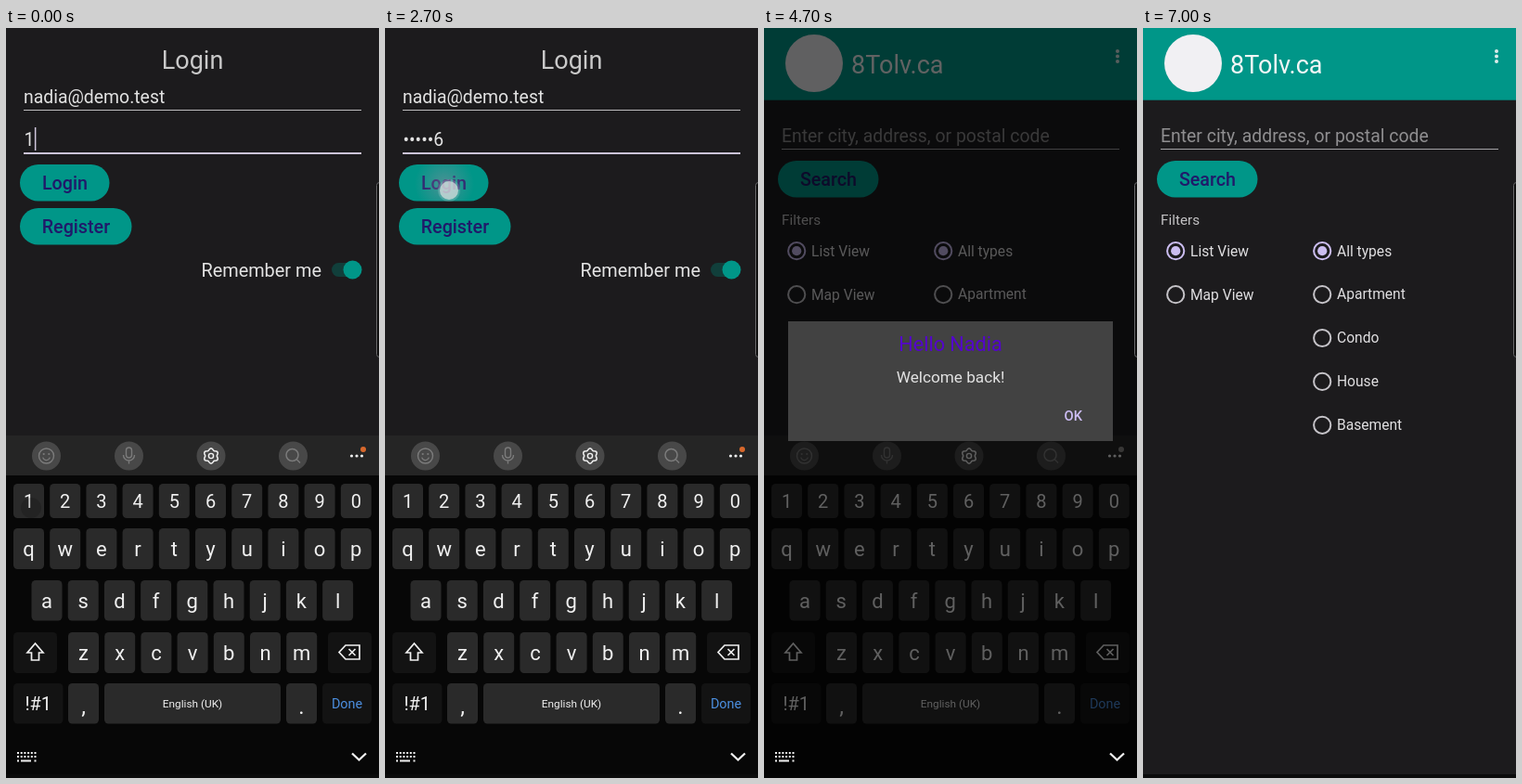
Write an HTML page with a canvas that moves like this. It is 402 px wide and 808 px high and loops after 7300 ms.

```html
<!DOCTYPE html>
<html lang="en">
<head>
<meta charset="utf-8">
<title>Login walkthrough</title>
<style>
html, body { margin: 0; width: 100%; height: 100%; overflow: hidden; background: #1c1b1d; }
canvas { display: block; width: 402px; height: 808px; }
</style>
</head>
<body>
<canvas id="stage" width="402" height="808"></canvas>
<script>
const ctx = document.getElementById('stage').getContext('2d');
const LOOP = 7300, STEP = 100;
const BG = '#1c1b1d', TEAL = '#009688', LAVENDER = '#cbbdf0', NAVY = '#20196a';
const TYPED_AT = [0, 400, 800, 1100, 1500, 1800];
const MASK_AT = 3300;

const clamp = v => Math.max(0, Math.min(1, v));
const ramp = (t, from, to) => clamp((t - from) / (to - from));

function text(str, x, y, size, color, align = 'left', weight = 400) {
  ctx.font = `${weight} ${size}px Roboto, sans-serif`;
  ctx.textAlign = align;
  ctx.fillStyle = color;
  ctx.fillText(str, x, y);
}

function rect(x, y, w, h, color) {
  ctx.fillStyle = color;
  ctx.fillRect(x, y, w, h);
}

function round(x, y, w, h, r, color) {
  ctx.beginPath();
  ctx.roundRect(x, y, w, h, r);
  ctx.fillStyle = color;
  ctx.fill();
}

function disc(x, y, r, color) {
  ctx.beginPath();
  ctx.arc(x, y, r, 0, Math.PI * 2);
  ctx.fillStyle = color;
  ctx.fill();
}

function ring(x, y, r, color, width) {
  ctx.beginPath();
  ctx.arc(x, y, r, 0, Math.PI * 2);
  stroke(color, width);
}

function stroke(color, width) {
  ctx.strokeStyle = color;
  ctx.lineWidth = width;
  ctx.stroke();
}

function poly(points, color, width, closed) {
  ctx.beginPath();
  points.forEach(([x, y]) => ctx.lineTo(x, y));
  if (closed) ctx.closePath();
  stroke(color, width);
}

function faded(alpha, draw) {
  if (alpha <= 0) return;
  ctx.save();
  ctx.globalAlpha = alpha;
  draw();
  ctx.restore();
}

function pill(label, y, w) {
  round(15, y, w, 39.6, 19.8, TEAL);
  text(label, 15.2 + w / 2, y + 27, 19.7, NAVY, 'center', 500);
}

function pointer(x, y, alpha, halo) {
  faded(alpha, () => {
    disc(x, y, halo, 'rgba(255,255,255,.16)');
    disc(x, y, 10, 'rgba(225,225,225,.68)');
  });
}

function drawPassword(t) {
  const count = TYPED_AT.filter(at => t >= at).length;
  const shown = t >= MASK_AT ? '•'.repeat(count) : '•'.repeat(count - 1) + count;
  text(shown, 19.5, 127, 19.4, '#e2e2e2');
  const width = ctx.measureText(shown).width;
  const idle = t - TYPED_AT[count - 1];
  if (idle % 1000 < 500) rect(20 + width, 107, 1.5, 25, '#cfc6dc');
}

function drawLogin(t) {
  rect(0, 0, 402, 808, BG);
  text('Login', 201, 43.5, 27, '#c9c9c9', 'center');
  text('nadia@demo.test', 19, 81, 19.4, '#e2e2e2');
  rect(19, 88, 364, 1, '#bdbcbe');
  drawPassword(t);
  rect(19, 134, 364, 2, '#cbc3d8');
  pill('Login', 147, 96.5);
  pill('Register', 194, 120.5);
  text('Remember me', 340, 268, 19.9, '#e2e2e2', 'right');
  round(351, 253, 32, 15, 7.5, '#113f3b');
  disc(373.5, 260.5, 10, TEAL);
}

function radio(label, x, y, on) {
  ring(x + 0.2, y + 0.2, 9.1, on ? LAVENDER : '#c5c3c8', 2);
  if (on) disc(x + 0.2, y + 0.2, 5.1, LAVENDER);
  text(label, x + 16, y + 5.5, 15.6, '#e0dfe1');
}

function drawHome() {
  rect(0, 0, 402, 808, BG);
  rect(0, 0, 402, 77.7, TEAL);
  disc(54, 38, 31, '#f1f0f3');
  text('8Tolv.ca', 94, 48.5, 27, '#f3f6f6');
  [25, 30.5, 36].forEach(y => disc(381, y, 2, '#dcebe9'));
  text('Enter city, address, or postal code', 19, 123, 19.4, '#8f8e90');
  rect(19, 130, 364, 1, '#a5a4a7');
  pill('Search', 143, 108.5);
  text('Filters', 19, 212, 15.3, '#c4c3c5');
  radio('List View', 35, 240, true);
  radio('Map View', 35, 287, false);
  ['All types', 'Apartment', 'Condo', 'House', 'Basement']
    .forEach((label, i) => radio(label, 193, 240 + i * 46.9, i === 0));
}

function drawToolIcons(badge) {
  rect(0, 439, 402, 43, '#252525');
  [43.5, 132.5, 221, 309.5].forEach(x => disc(x, 461, 15.5, '#484848'));
  const dim = '#7b7b7b';
  ring(43.5, 461, 8, dim, 1.4);
  disc(40.7, 459, 1.1, dim);
  disc(46.3, 459, 1.1, dim);
  ctx.beginPath();
  ctx.arc(43.5, 461.5, 4, 0.3, Math.PI - 0.3);
  stroke(dim, 1.3);

  ctx.beginPath();
  ctx.roundRect(129.5, 452, 6, 11, 3);
  stroke(dim, 1.4);
  ctx.beginPath();
  ctx.arc(132.5, 460, 6, 0, Math.PI);
  ctx.moveTo(132.5, 466);
  ctx.lineTo(132.5, 469.5);
  stroke(dim, 1.4);

  const gear = [];
  for (let i = 0; i < 72; i++) {
    const a = i / 72 * Math.PI * 2, r = 7.2 + 0.9 * Math.cos(6 * a + Math.PI);
    gear.push([221 + r * Math.cos(a), 461 + r * Math.sin(a)]);
  }
  poly(gear, '#f2f2f2', 1.5, true);
  ring(221, 461, 2.6, '#f2f2f2', 1.4);

  ring(308.5, 460, 6.5, dim, 1.5);
  poly([[313, 464.5], [317, 468.5]], dim, 1.5);
  [372.5, 378, 383.5].forEach(x => disc(x, 461, 1.6, '#eeeeee'));
  disc(385, 454, 3, badge);
}

function key(x, y, w, h, label, size, color = '#f0f0f0', fill = '#2a2a2a') {
  round(x, y, w, h, 4.5, fill);
  text(label, x + w / 2, y + h / 2 + size * 0.36, size, color, 'center');
}

function keyRow(chars, firstX, y, h, size) {
  [...chars].forEach((c, i) => key(firstX + i * 39.2, y, 33, h, c, size));
}

function drawKeyboard(badge) {
  const white = '#f0f0f0', darkKey = '#131313';
  rect(0, 439, 402, 369, '#070707');
  drawToolIcons(badge);
  keyRow('1234567890', 8, 491, 37, 20);
  keyRow('qwertyuiop', 8, 539, 44, 22);
  keyRow('asdfghjkl', 27.5, 595, 43.5, 22);
  keyRow('zxcvbnm', 67, 651, 44, 22);
  round(8, 651, 47, 44, 4.5, darkKey);
  round(347, 651, 47, 44, 4.5, darkKey);
  poly([[31.5, 663], [40, 673], [35.5, 673], [35.5, 681], [27.5, 681], [27.5, 673], [23, 673]], white, 1.7, true);
  poly([[359, 672.5], [366, 665], [381, 665], [381, 680], [366, 680]], white, 1.7, true);
  poly([[369.5, 669], [376.5, 676]], white, 1.6);
  poly([[376.5, 669], [369.5, 676]], white, 1.6);
  key(8, 706, 53.5, 43.5, '!#1', 20, white, darkKey);
  key(67, 706, 33, 43.5, '', 22);
  text(',', 83.5, 739, 24, white, 'center');
  key(106, 706, 190, 43.5, 'English (UK)', 11.8);
  key(302, 706, 33, 43.5, '', 22);
  text('.', 318.5, 739, 24, white, 'center');
  key(341, 706, 53, 43.5, 'Done', 14.4, '#4c8fe0', darkKey);
}

function drawNavIcons() {
  const white = '#f0f0f0';
  for (let i = 0; i < 6; i++) {
    [780, 784].forEach(y => rect(12 + i * 3.7, y, 2, 2, white));
  }
  rect(12, 788.5, 2, 2, white);
  rect(16, 788.5, 11, 2, white);
  rect(30.5, 788.5, 2, 2, white);
  poly([[373, 781.5], [380.5, 788.5], [388, 781.5]], white, 2.3);
}

function drawDialog() {
  rect(26, 316, 350, 129, '#424242');
  text('Hello Nadia', 201, 347.5, 21.6, '#5404cc', 'center');
  text('Welcome back!', 201, 382, 17.2, '#e2e2e2', 'center');
  text('OK', 333.3, 423.3, 14.7, '#cdbdf5', 'center', 500);
}

function drawEdgeHandle() {
  ctx.beginPath();
  ctx.roundRect(399.5, 166.5, 10, 188, 3);
  ctx.fillStyle = '#0d0d0d';
  ctx.fill();
  stroke('#69696b', 1);
}

function drawKeyTouches(t) {
  if (t < 100) disc(27, 517, 11, 'rgba(0,0,0,.16)');
  TYPED_AT.slice(1).forEach((at, i) => {
    const alpha = Math.min(ramp(t, at - 200, at - 100), 1 - ramp(t, at, at + 100));
    pointer(27 + (i + 1) * 39.8, 517, alpha, 18);
  });
}

function drawLoginTouch(t) {
  const alpha = Math.min(ramp(t, 2600, 2700), 1 - ramp(t, 2900, 3100));
  if (alpha <= 0) return;
  faded(alpha, () => {
    ctx.beginPath();
    ctx.roundRect(15, 147, 96.5, 39.6, 19.8);
    ctx.clip();
    const r = 32 + ramp(t, 2700, 2900) * 40;
    const glow = ctx.createRadialGradient(64, 168, 0, 64, 168, r);
    glow.addColorStop(0, 'rgba(150,140,160,.5)');
    glow.addColorStop(1, 'rgba(150,140,160,0)');
    rect(15, 147, 97, 40, glow);
  });
  pointer(69, 175, alpha, 12);
}

function render(t) {
  const home = ramp(t, 4300, 4500);
  const dialog = Math.min(ramp(t, 4400, 4700), 1 - ramp(t, 6450, 6700));
  const dim = Math.min(ramp(t, 4400, 4650), 1 - ramp(t, 6500, 6800));
  const drop = ramp(t, 6500, 6800) ** 2 * 369;
  const hideTouch = Math.min(ramp(t, 6200, 6400), 1 - ramp(t, 6500, 6700));

  if (home < 1) drawLogin(t);
  faded(home, drawHome);

  ctx.save();
  ctx.translate(0, drop);
  if (drop < 369) drawKeyboard(home > 0 ? '#8d8a88' : '#d8682c');
  ctx.restore();
  rect(0, 804, 402, 4, '#0b0b0b');

  faded(dim * 0.6, () => rect(0, 0, 402, 808, '#000'));
  faded(dialog, drawDialog);

  faded(hideTouch, () => round(358, 762, 46, 46, 14, '#363636'));
  ctx.save();
  ctx.translate(0, drop);
  if (drop < 369) drawNavIcons();
  ctx.restore();
  pointer(384, 797, hideTouch, 12);

  drawKeyTouches(t);
  drawLoginTouch(t);
  drawEdgeHandle();
}

const start = performance.now();
function tick() {
  const t = (performance.now() - start) % LOOP;
  render(Math.floor(t / STEP) * STEP);
  requestAnimationFrame(tick);
}
tick();
</script>
</body>
</html>
```
